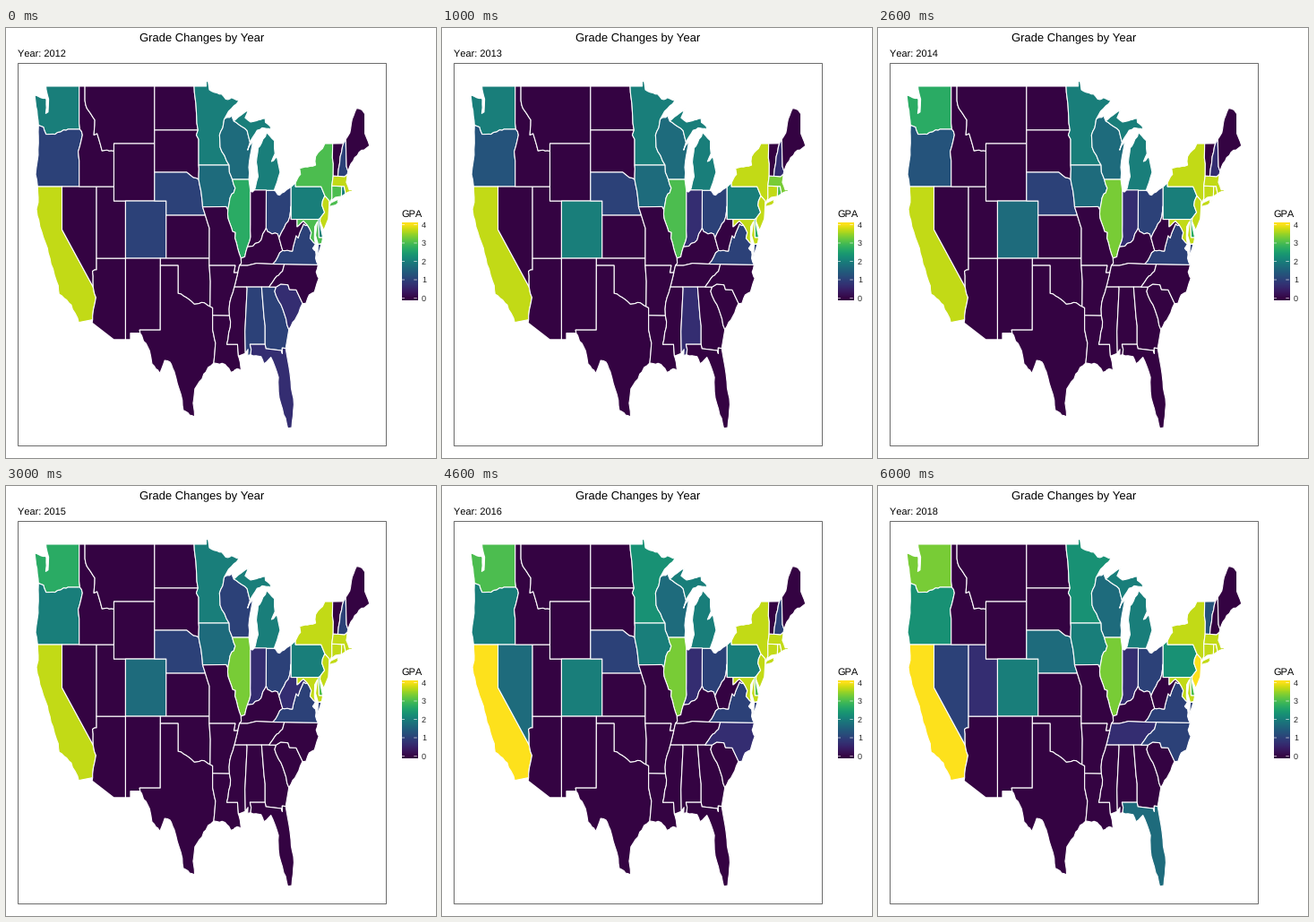
Recreate the animation shown at these times as a matplotlib script. Size 480x480 px, loop 7 s.

```python
import matplotlib.pyplot as plt
import numpy as np
from matplotlib.animation import FuncAnimation
from matplotlib.colors import ListedColormap
from matplotlib.patches import Polygon, Rectangle

plt.rcParams.update({"font.family": "Liberation Sans", "text.hinting": "none",
                     "text.hinting_factor": 1})
SIZE, DPI = 480, 72
LEFT, RIGHT, TOP, BOTTOM = 13.5, 424.5, 39.5, 466.5
WEST, EAST, NORTH, SOUTH = 124.68, 67, 49.38, 25.13
rng = np.random.default_rng(4)

# Grades change only in the years listed; anything never listed is zero
CHANGES = {
    2012: {3.7: "CA MA NJ", 3: "NY CT MD", 2.7: "IL", 2: "WA MN MI PA DE RI", 1.7: "WI IA",
           1: "OR CO NE OH VA AL GA NH", 0.7: "SC FL"},
    2013: {3.7: "NY CT MD", 3.3: "MA", 3: "IL RI", 2.7: "DE", 2: "CO", 1.3: "OR",
           0.7: "IN AL NH", 0: "GA SC FL"},
    2014: {3.7: "MA RI", 3.3: "IL", 2.7: "WA", 1.7: "CO", 0: "AL"},
    2015: {3: "DE", 2: "OR", 1: "WI NH", 0.7: "WV"},
    2016: {4: "CA", 3: "WA", 2.3: "MN", 2: "CO IA", 1.7: "NV WI", 0.7: "NC", 0: "WV"},
    2017: {1.7: "IA", 1: "NV", 0.7: "TN", 0: "NH"},
    2018: {4: "NJ", 3.3: "WA", 2.3: "OR PA", 2: "IA", 1.7: "NE FL", 1.3: "VT", 1: "NC",
           0.7: "UT"},
}
YEARS = list(CHANGES)


def P(*v):
    """Straight line through degrees west, degrees north."""
    return np.reshape(v, (-1, 2)).astype(float)


def rough(*v):
    """River or coast: key points joined with small random bends."""
    pts, parts = P(*v), []
    for a, b in zip(pts, pts[1:]):
        n = 1 + int(np.hypot(*(b - a)) / 0.5)
        seg = a + (b - a) * np.arange(n)[:, None] / n
        seg[1:] += rng.normal(0, 0.04, (n - 1, 2))
        parts.append(seg)
    return np.vstack(parts + [pts[-1:]])


def box(west, east, north, south):
    return P(west, north, east, north, east, south, west, south)


def rev(line):
    return line[::-1]


def grades(year):
    return {state: gpa for y in YEARS if y <= year
            for gpa, names in CHANGES[y].items() for state in names.split()}


def to_pixels(deg):
    """Fit the map's range into the panel with 5% room on each side."""
    w, h = (RIGHT - LEFT) / 1.1, (BOTTOM - TOP) / 1.1
    x = LEFT + 0.05 * w + w * (WEST - deg[:, 0]) / (WEST - EAST)
    y = TOP + 0.05 * h + h * (NORTH - deg[:, 1]) / (NORTH - SOUTH)
    return np.column_stack([x, y])


def mac_viridis():
    """Viridis taken from sRGB to a display gamma of 1.8."""
    rgb = plt.get_cmap("viridis")(np.linspace(0, 1, 256))[:, :3]
    linear = np.where(rgb < 0.04045, rgb / 12.92, ((rgb + 0.055) / 1.055) ** 2.4)
    return ListedColormap(linear ** (1 / 1.8))


# Shared borders, west to east
columbia = rough(124.05, 46.28, 123.2, 46.15, 122.75, 45.65, 121.2, 45.65, 119.3, 45.93, 118.98, 46)
snake = rough(116.92, 46, 116.48, 45.6, 117.2, 44.45, 117.03, 43.8)
colorado = rough(114.72, 32.72, 114.6, 33.4, 114.15, 34.27, 114.63, 35)
mead = rough(114.63, 35, 114.74, 36.1, 114.05, 36.2)
bitterroot = rough(116.05, 48, 115.7, 47.45, 114.35, 46.65, 114.5, 45.6, 113.95, 45.7,
                   113.1, 44.5, 111.05, 44.48)
red_north = rough(97.23, 49, 96.8, 46.9, 96.56, 45.94)
big_stone = P(96.56, 45.94, 96.85, 45.6, 96.45, 45.3, 96.45, 43.5)
sioux = rough(96.45, 43.5, 96.45, 42.5)
mo_upper = rough(98.5, 43, 97.9, 42.8, 96.45, 42.5)
mo_iowa = rough(96.45, 42.5, 95.9, 41.2, 95.77, 40.58)
mo_kansas = rough(95.77, 40.58, 95.3, 40, 95, 39.6, 94.6, 39.1)
ok_east = P(94.62, 36.5, 94.43, 35.4, 94.48, 33.64)
red_south = rough(94.48, 33.64, 95.5, 33.9, 97.2, 33.8, 98.1, 34.13, 100, 34.56)
sabine = rough(94.04, 32, 93.55, 31.1, 93.7, 30.3, 93.85, 29.7)
mn_wi = rough(92.05, 46.7, 92.3, 46.1, 92.85, 45.6, 92.75, 44.75, 91.2, 43.5)
ia_wi = rough(91.2, 43.5, 91.15, 43, 90.65, 42.5)
ia_il = rough(90.65, 42.5, 90.15, 41.9, 91.05, 41.2, 91.42, 40.38)
mo_il = rough(91.42, 40.38, 91.4, 39.8, 90.6, 38.87, 90.15, 38.8, 90.2, 38.4, 89.15, 37)
mo_tn = rough(89.42, 36.5, 89.7, 36)
ar_mo = P(94.62, 36.5, 90.15, 36.5, 90.38, 36, 89.7, 36)
ar_tn = rough(89.7, 36, 90.3, 35)
ar_ms = rough(90.3, 35, 91.1, 33.9, 91.15, 33)
la_ms = rough(91.15, 33, 91, 32.2, 91.6, 31)
pearl = P(91.6, 31, 89.75, 31, 89.6, 30.18)
wi_mi = rough(90.4, 46.57, 88.1, 45.9, 87.6, 45.1)
wabash = rough(87.53, 39.35, 87.5, 38.5, 88.05, 37.8)
ohio_il = rough(88.05, 37.8, 88.5, 37.1, 89.15, 37)
ohio_in = rough(84.82, 39.1, 85.4, 38.7, 85.7, 38.27, 87.1, 37.85, 88.05, 37.8)
ohio_ky = rough(82.6, 38.42, 82.85, 38.7, 84.2, 38.8, 84.82, 39.1)
ohio_wv = rough(80.52, 40.64, 80.75, 39.9, 81.75, 39.1, 82.6, 38.42)
ky_wv = rough(82.6, 38.42, 81.97, 37.54)
ky_va = rough(81.97, 37.54, 83.68, 36.6)
ky_tn = P(83.68, 36.6, 86.5, 36.65, 88.05, 36.5, 89.42, 36.5)
tn_nc = rough(81.68, 36.59, 82, 36.1, 83, 35.75, 84.32, 35)
va_wv = rough(77.72, 39.32, 78.35, 39.4, 79.3, 38.42, 79.65, 38.58, 80.3, 37.5, 81.97, 37.54)
md_wv = rough(79.48, 39.2, 78.4, 39.6, 77.72, 39.32)
potomac = rough(77.72, 39.32, 77.04, 38.8, 77.25, 38.4, 76.33, 38)
ms_al = P(88.2, 35, 88.1, 34.9, 88.47, 31.9, 88.4, 30.37)
al_ga = P(85.6, 35, 85.18, 32.87, 85, 32.3, 85, 31)
al_fl = P(85, 31, 87.6, 31, 87.4, 30.65, 87.5, 30.28)
ga_fl = P(81.45, 30.72, 82.05, 30.75, 82.05, 30.36, 82.2, 30.57, 84.86, 30.7, 85, 31)
savannah = rough(83.1, 35, 83.35, 34.7, 81.95, 33.45, 80.9, 32.03)
nc_sc = P(78.55, 33.86, 79.65, 34.8, 80.8, 34.82, 81.05, 35.15, 82.3, 35.2, 83.1, 35)
delaware = rough(74.7, 41.36, 75.1, 41, 75.2, 40.7, 74.75, 40.2, 75.45, 39.82)
ny_ct = P(73.5, 42.05, 73.48, 41.2, 73.65, 41)
ny_vt = P(73.35, 45, 73.4, 44, 73.25, 43.6, 73.27, 42.75)
vt_nh = rough(71.5, 45.01, 72.05, 44.1, 72.46, 42.73)
nh_ma = P(72.46, 42.73, 71.3, 42.7, 70.82, 42.87)
nh_me = P(71.1, 45.3, 70.98, 43.4, 70.7, 43.07)
ri_ma = P(71.8, 42.02, 71.38, 42.02, 71.13, 41.5)
de_md = P(75.79, 39.72, 75.7, 38.46, 75.05, 38.45)

# Each state is a closed chain of borders; some have a second part
STATES = [
    ("WA", rough(122.76, 49, 122.3, 48.1, 122.4, 47.2, 122.8, 47.1, 122.7, 48.1, 123.2, 48.15,
                 124.7, 48.38, 124.3, 47.3, 124.05, 46.28), columbia,
     P(116.92, 46, 117.04, 46.42, 117.03, 49)),
    ("OR", rough(124.05, 46.28, 124.1, 44.2, 124.55, 42.85, 124.2, 42), P(117.03, 42),
     rev(snake), rev(columbia)),
    ("CA", rough(124.2, 42, 124.1, 40.9, 124.4, 40.43, 123.8, 39.2, 122.5, 37.7, 121.9, 36.6,
                 120.65, 35.1, 120.5, 34.5, 119.2, 34.1, 118.4, 33.75, 117.12, 32.53),
     colorado, P(120, 39, 120, 42)),
    ("NV", P(120, 42, 120, 39), mead, P(114.05, 42)),
    ("AZ", mead, P(114.05, 37, 109.05, 37, 109.05, 31.33, 111.07, 31.33, 114.81, 32.5), colorado),
    ("UT", P(114.05, 42, 111.05, 42, 111.05, 41, 109.05, 41, 109.05, 37, 114.05, 37)),
    ("ID", P(117.03, 49, 116.05, 49), bitterroot, P(111.05, 42, 117.03, 42), rev(snake),
     P(117.04, 46.42)),
    ("MT", P(104.05, 49, 104.05, 45, 111.05, 45), rev(bitterroot), P(116.05, 49)),
    ("WY", box(111.05, 104.05, 45, 41)),
    ("CO", box(109.05, 102.05, 41, 37)),
    ("NM", P(109.05, 37, 103.04, 37, 103.06, 32, 106.62, 32, 106.53, 31.78, 108.2, 31.78,
             108.2, 31.33, 109.05, 31.33)),
    ("ND", P(104.05, 49), red_north, P(104.05, 45.94)),
    ("SD", P(104.05, 45.94), big_stone, sioux, rev(mo_upper), P(104.05, 43)),
    ("NE", P(104.05, 43), mo_upper, mo_iowa, mo_kansas[:3], P(95.3, 40, 102.05, 40, 102.05, 41,
                                                              104.05, 41)),
    ("KS", P(102.05, 40, 95.3, 40), mo_kansas[3:], P(94.62, 37, 102.05, 37)),
    ("OK", P(103.04, 37, 94.62, 37), ok_east, red_south, P(100, 36.5, 103.04, 36.5)),
    ("TX", P(103.04, 36.5, 100, 36.5), rev(red_south), P(94.04, 33.55), sabine,
     rough(93.85, 29.7, 94.8, 29.4, 97.1, 27.9, 97.4, 26.9, 97.15, 25.95, 99.1, 26.4,
           99.5, 27.5, 100.65, 29.1, 101.4, 29.77, 102.3, 29.88, 103.15, 28.98, 104.5, 29.65,
           104.9, 30.55, 106.53, 31.78), P(106.62, 32, 103.06, 32)),
    ("MN", red_north, big_stone, rev(mn_wi),
     rough(92.05, 46.7, 91.3, 47.25, 89.5, 48, 90.8, 48.2, 91.4, 48.07, 92.5, 48.45,
           94.6, 48.75, 94.8, 49.3), P(95.15, 49.38, 95.15, 49)),
    ("IA", sioux, mo_iowa, P(91.72, 40.6), rev(ia_il), rev(ia_wi)),
    ("WI", mn_wi, ia_wi, rough(87.8, 42.5, 87.7, 43.8, 87.1, 45.2, 88, 44.55, 87.6, 45.1),
     rev(wi_mi), rough(90.4, 46.57, 90.75, 46.95, 92.05, 46.7)),
    ("MI", rough(90.4, 46.57, 88.45, 47.2, 87.8, 47.45, 88.45, 46.8, 87.5, 46.5, 86.1, 46.65,
                 85, 46.75, 84.95, 46.48, 84.1, 46.2, 84, 45.97, 85.5, 46.1, 86.7, 45.7,
                 87.6, 45.1), rev(wi_mi)),
    ("MI", rough(84.75, 45.77, 83.4, 45.2, 83.3, 44.3, 83.9, 43.75, 82.95, 44.07, 82.42, 43,
                 83.45, 41.73), P(84.8, 41.73),
     rough(86.82, 41.76, 86.2, 42.7, 86.5, 43.7, 86.2, 44.7, 85.6, 45.05, 84.75, 45.77)),
    ("IL", ia_il, mo_il, rev(ohio_il), rev(wabash), P(87.53, 41.7, 87.8, 42.5)),
    ("IN", P(87.53, 41.7), wabash, rev(ohio_in), P(84.8, 41.76, 86.82, 41.76, 87.2, 41.62)),
    ("OH", ohio_wv, ohio_ky, P(84.8, 41.73), rough(83.45, 41.73, 82.5, 41.4, 80.52, 41.98)),
    ("MO", mo_il, P(89.1, 36.65), mo_tn, rev(ar_mo), P(94.62, 37), rev(mo_kansas),
     P(91.72, 40.6)),
    ("KY", ky_wv, ky_va, ky_tn, P(89.1, 36.65), rev(ohio_il), rev(ohio_in), rev(ohio_ky)),
    ("TN", P(81.68, 36.59), ky_tn, mo_tn, ar_tn, rev(tn_nc)),
    ("AR", ar_mo, ar_tn, ar_ms, P(94.04, 33.02, 94.04, 33.55), rev(ok_east)),
    ("LA", la_ms, pearl, rough(89.6, 30.18, 89.3, 29.75, 89.1, 29.1, 89.8, 29.3, 90.9, 29.05,
                               91.9, 29.6, 93.85, 29.7), rev(sabine), P(94.04, 33.02)),
    ("MS", ar_ms, la_ms, pearl, rev(ms_al)),
    ("AL", ms_al, P(87.95, 30.65, 88, 30.23), rev(al_fl), rev(al_ga)),
    ("GA", savannah, ga_fl, rev(al_ga)),
    ("FL", rough(81.45, 30.72, 80.55, 28.4, 80.03, 26.8, 80.4, 25.2, 81.1, 25.15, 81.8, 26.1,
                 82.7, 27.7, 82.7, 28.7, 84, 30.1, 85.2, 29.65, 85.7, 30.15, 87.5, 30.28),
     rev(al_fl), rev(ga_fl)),
    ("SC", nc_sc, savannah, rough(80.9, 32.03, 79.2, 33.2, 78.55, 33.86)),
    ("NC", tn_nc, rev(nc_sc), rough(78.55, 33.86, 77.95, 33.87, 77.4, 34.45, 76.5, 34.65,
                                    75.75, 35.6, 76.2, 36.05, 75.87, 36.55)),
    ("VA", potomac, rough(76.33, 38, 76.8, 37.7, 76.3, 37.5, 76.3, 37, 75.87, 36.55),
     P(81.68, 36.59), rev(ky_va), rev(va_wv)),
    ("VA", P(75.85, 37.98, 75.3, 37.98, 75.98, 37.1)),
    ("WV", ohio_wv, ky_wv, rev(va_wv), rev(md_wv), P(79.48, 39.72, 80.52, 39.72)),
    ("MD", de_md, P(75.25, 38.03, 75.85, 37.98, 76.3, 38.6, 76, 39.55, 76.45, 39.2, 76.5, 38.4),
     rev(potomac), rev(md_wv), P(79.48, 39.72)),
    ("DE", de_md, P(75.4, 39.1, 75.55, 39.45, 75.45, 39.82)),
    ("PA", delaware, P(75.79, 39.72, 80.52, 39.72, 80.52, 41.98, 79.76, 42.27, 79.76, 42,
                       75.35, 42)),
    ("NJ", delaware, P(75.55, 39.6, 74.9, 38.95, 74.1, 39.75, 74, 40.45, 73.9, 41)),
    ("NY", ny_vt, ny_ct, P(73.95, 40.75, 73.9, 41, 74.7, 41.36, 75.35, 42, 79.76, 42),
     rough(79.76, 42.27, 78.9, 42.85, 79.05, 43.27, 76.3, 43.5, 76.3, 44.1, 74.7, 45)),
    ("NY", P(74, 40.6, 73.7, 40.87, 72.3, 41.13, 72.5, 40.94, 71.9, 41.07, 72.8, 40.72)),
    ("CT", ny_ct, P(72.9, 41.25, 71.85, 41.32, 71.8, 42.02)),
    ("RI", ri_ma, P(71.85, 41.32)),
    ("MA", nh_ma, rough(70.82, 42.87, 71, 42.3, 70.5, 41.77, 70.05, 41.78, 70.2, 42.07,
                        69.97, 41.65, 71.13, 41.5), rev(ri_ma), P(73.5, 42.05, 73.27, 42.75)),
    ("VT", ny_vt, rev(vt_nh)),
    ("NH", vt_nh, nh_ma, rev(nh_me)),
    ("ME", nh_me, rough(70.7, 43.07, 70.2, 43.6, 68.8, 44.4, 67, 44.85, 67.8, 45.7),
     P(67.8, 47.07), rough(68.3, 47.35, 69.23, 47.46, 70, 46.7, 70.4, 45.75, 71.1, 45.3)),
]

cmap = mac_viridis()
fig = plt.figure(figsize=(SIZE / DPI, SIZE / DPI), dpi=DPI, facecolor="white")
ax = fig.add_axes([0, 0, 1, 1])
ax.axis("off")

shapes = []
for name, *lines in STATES:
    patch = Polygon(to_pixels(np.vstack(lines)), ec="white", lw=1.1, joinstyle="round",
                    snap=False)
    shapes.append((name, ax.add_patch(patch)))
ax.add_patch(Rectangle((LEFT, TOP), RIGHT - LEFT, BOTTOM - TOP, fill=False, ec="#5c5c5c",
                       lw=0.9, snap=False))

# Legend
BAR = (441.5, 458.8, 303.7, 217.3)
ax.imshow(np.linspace(4, 0, 20)[:, None], cmap=cmap, vmin=0, vmax=4, aspect="auto",
          interpolation="bilinear", extent=BAR)
for grade in range(5):
    y = 301.5 - 20.5 * grade
    for x in (BAR[0], BAR[1] - 3.5):
        ax.plot([x, x + 3.5], [y, y], color="white", lw=0.6, solid_capstyle="butt", snap=False)
    ax.text(464, y + 3.4, str(grade), size=8.8, color="#222222")
ax.text(441, 211, "GPA", size=11)
ax.text((LEFT + RIGHT) / 2, 15, "Grade Changes by Year", size=13.2, ha="center")
year_text = ax.text(13, 32, "", size=11)
ax.set_xlim(0, SIZE)
ax.set_ylim(SIZE, 0)


def draw(i):
    year_text.set_text(f"Year: {YEARS[i]}")
    gpa = grades(YEARS[i])
    for name, patch in shapes:
        patch.set_facecolor(cmap(gpa.get(name, 0) / 4))
    return [year_text]


anim = FuncAnimation(fig, draw, frames=len(YEARS), interval=1000, repeat=True, repeat_delay=0)
plt.show()
```
